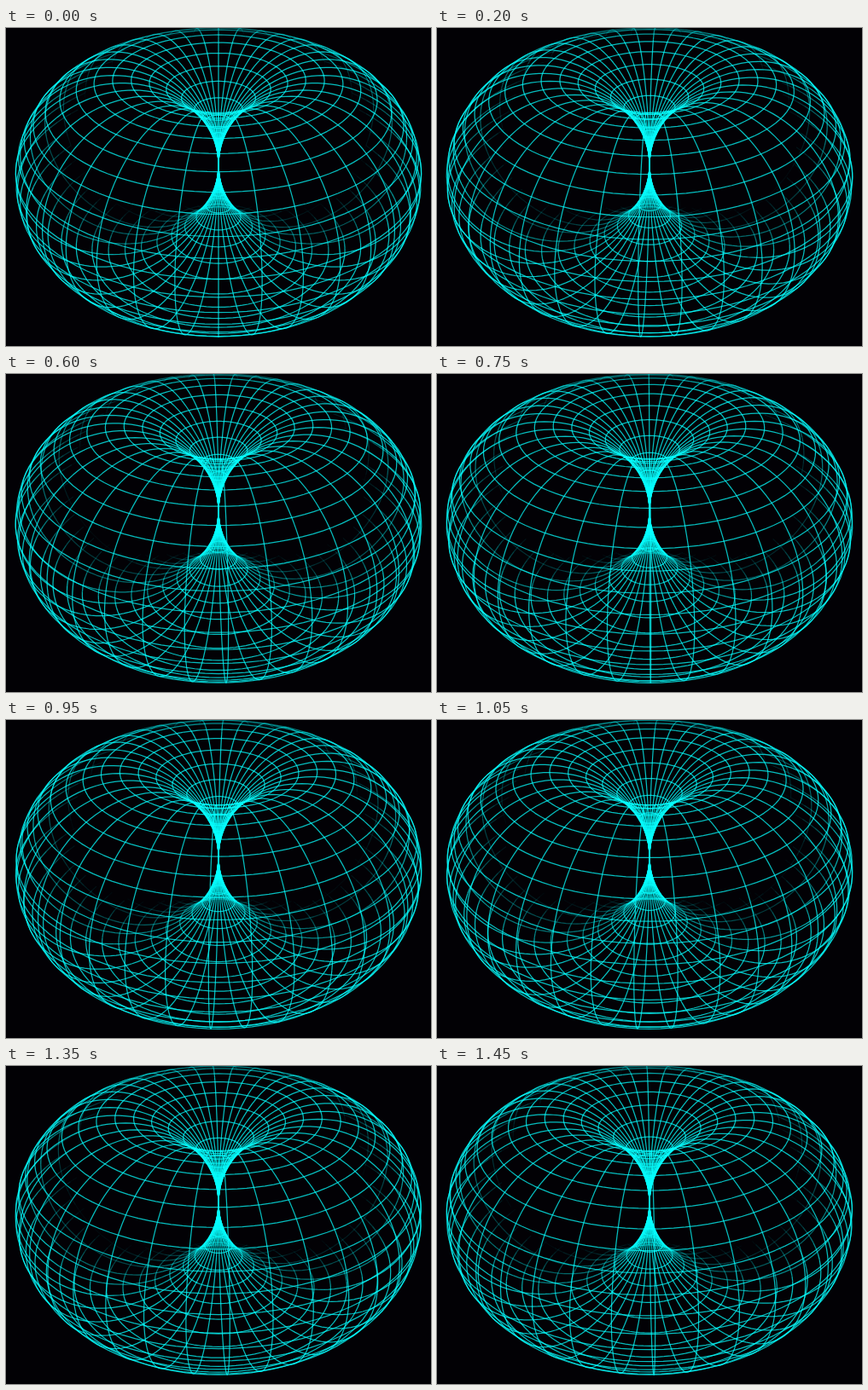
Animation, 498 px wide and 373 px high, one loop 1500 ms. Source, as an HTML page with a canvas:

```html
<!DOCTYPE html>
<html lang="en">
<head>
<meta charset="utf-8">
<title>Rolling horn torus</title>
<style>
  html, body { margin: 0; width: 100%; height: 100%; overflow: hidden; background: #020105; }
  canvas { display: block; }
</style>
</head>
<body>
<canvas id="stage" width="498" height="373"></canvas>
<script>
const ctx = document.getElementById('stage').getContext('2d');
const TAU = Math.PI * 2;
const LOOP = 1500, STEP = 50;
const CX = 249, CY = 160.5;     // pinch point on the stage
const SIZE = 115.7;             // tube radius in pixels
const DIST = 8.1;               // camera distance in tube radii
const RISE = 30;                // optical axis passes this far above the pinch
const TILT = TAU / 12;
const LINES = 36, CELL = TAU / LINES;
const SEGS = 108;
const SHADES = 20;
const SIN = Math.sin(TILT), COS = Math.cos(TILT);

// u turns around the axis (0 faces the viewer), v around the tube (0 is outermost)
function project(u, v) {
  const rho = 1 + Math.cos(v), h = Math.sin(v);
  const front = rho * Math.cos(u);
  const depth = -front * COS - h * SIN;
  const k = 1 / (1 + depth / DIST);
  return {
    x: CX + rho * Math.sin(u) * SIZE * k,
    y: CY - RISE + ((front * SIN - h * COS) * SIZE + RISE) * k,
    depth
  };
}

function fade(depth) {
  return Math.max(0, Math.min(1, (1.07 - depth) / 0.85));
}

// Strokes one closed curve as runs of equal brightness
function drawCurve(pointAt) {
  let a = pointAt(0), last = 0;
  for (let i = 1; i <= SEGS; i++) {
    const b = pointAt(i / SEGS * TAU);
    const shade = Math.round(fade((a.depth + b.depth) / 2) * SHADES);
    if (shade !== last) {
      if (last) ctx.stroke();
      ctx.globalAlpha = 0.74 * shade / SHADES;
      ctx.beginPath();
      ctx.moveTo(a.x, a.y);
    }
    ctx.lineTo(b.x, b.y);
    last = shade;
    a = b;
  }
  if (last) ctx.stroke();
}

function draw(step) {
  const turn = -step * 2 / 31 * CELL;
  const roll = -step / 31 * CELL;

  ctx.globalAlpha = 1;
  ctx.fillStyle = '#020105';
  ctx.fillRect(0, 0, 498, 373);
  ctx.strokeStyle = '#08ffff';
  ctx.lineWidth = 1.25;
  ctx.lineJoin = 'round';
  for (let i = 0; i < LINES; i++) {
    const u = i * CELL + turn, v = i * CELL + roll;
    drawCurve(s => project(u, s));
    drawCurve(s => project(s, v));
  }
}

const start = performance.now();
let shown = -1;
function tick() {
  const step = Math.floor((performance.now() - start) % LOOP / STEP);
  if (step !== shown) draw(shown = step);
  requestAnimationFrame(tick);
}
tick();
</script>
</body>
</html>
```
